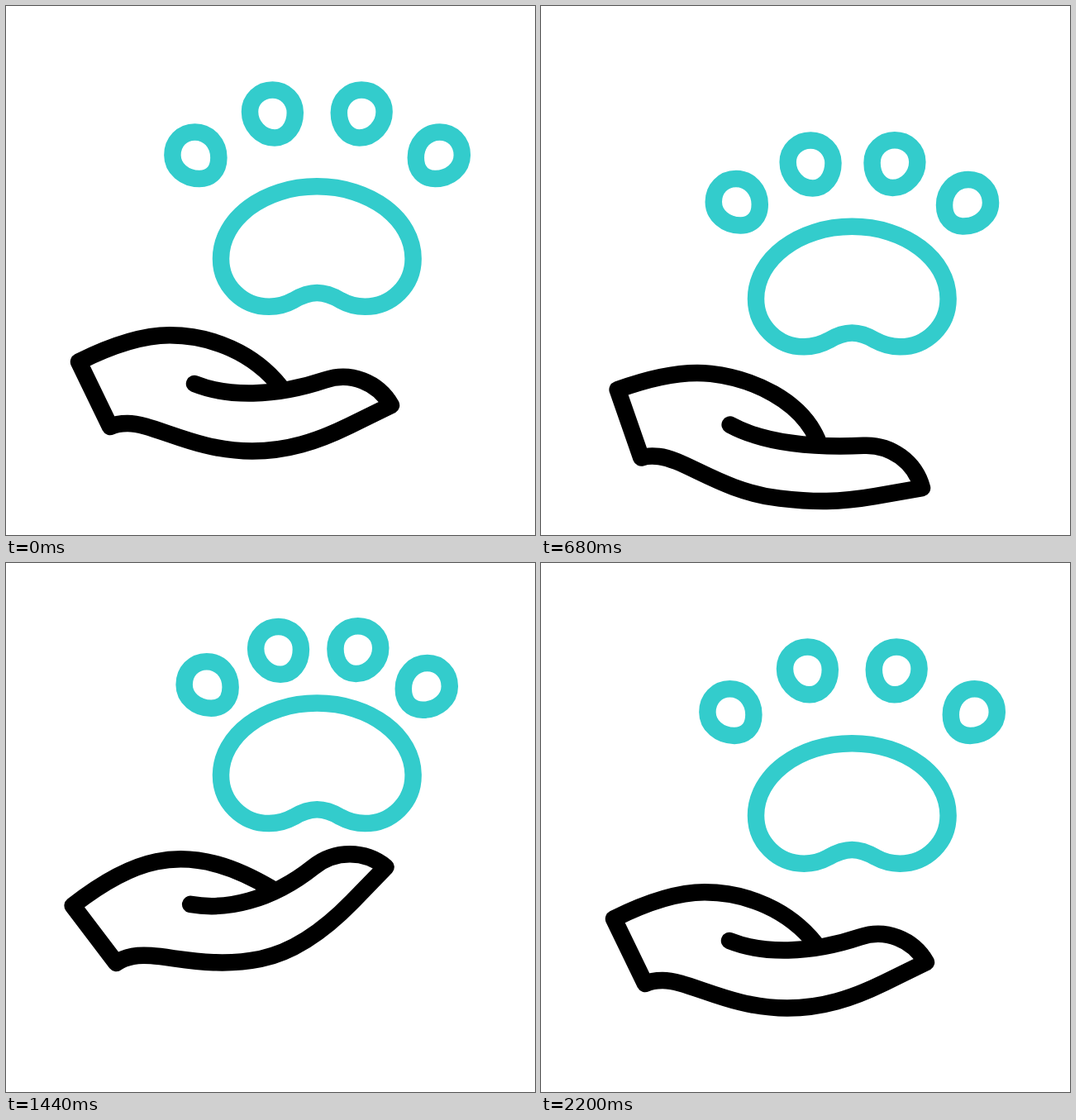
An HTML page for the animation above (2.28 s loop, 640 by 640 pixels).

```html
<!DOCTYPE html>
<html lang="en">
<head>
<meta charset="utf-8">
<title>Hand and paw</title>
<style>
  html, body { margin: 0; width: 100%; height: 100%; overflow: hidden; background: #fff; }
  svg { display: block; width: 100vw; height: 100vh; }
  path { fill: none; stroke-width: 20.5; stroke-linecap: round; stroke-linejoin: round; }
  #paw { stroke: #3cc; }
  #hand { stroke: #000; }
</style>
</head>
<body>
<svg viewBox="0 0 640 640">
  <defs>
    <path id="outer" d="M228.5 152.4C245 152.4 257.4 166 257.4 183.5C257.4 199 248 209 234 209C216 209 201.4 196.5 201.4 180.5C201.4 164.5 213 152.4 228.5 152.4Z"/>
    <path id="inner" d="M322.5 101.5C337.7 101.5 349.8 113.5 349.8 129C349.8 146 339.5 159.4 325 159.4C308 159.4 295 144 295 128C295 113 307 101.5 322.5 101.5Z"/>
  </defs>
  <g id="paw">
    <path d="M376.3 218.3C312 218.3 260 257.5 260 305.7C260 338 286 363.8 318.3 363.8C329 363.8 339 361 348 356C356.5 351 366 347 376.3 347C386.6 347 396.1 351 404.6 356C413.6 361 423.6 363.8 434.3 363.8C466.6 363.8 492.6 338 492.6 305.7C492.6 257.5 440.6 218.3 376.3 218.3Z"/>
    <g class="toe"><use href="#outer"/></g>
    <g class="toe"><use href="#inner"/></g>
    <g class="toe"><use href="#inner" transform="translate(752.6) scale(-1 1)"/></g>
    <g class="toe"><use href="#outer" transform="translate(753.2) scale(-1 1)"/></g>
  </g>
  <path id="hand"/>
</svg>
<script>
const LOOP = 2280, STEP = 40;
const paw = document.getElementById('paw');
const hand = document.getElementById('hand');
const toes = document.querySelectorAll('.toe');
const toeShift = [[18, 19.5], [9, 30.5], [-5.5, 29.5], [-19, 22]];

// cubic-bezier(.5, 0, .5, 1)
function ease(x) {
  let lo = 0, hi = 1;
  for (let i = 0; i < 24; i++) {
    const s = (lo + hi) / 2;
    if (1.5 * s * (1 - s) + s ** 3 < x) lo = s; else hi = s;
  }
  return lo * lo * (3 - 2 * lo);
}

// keys: [time, ...values]
function track(keys, t) {
  if (t <= keys[0][0]) return keys[0].slice(1);
  const n = keys.findIndex(k => k[0] > t);
  if (n < 0) return keys[keys.length - 1].slice(1);
  const a = keys[n - 1], b = keys[n];
  const u = ease((t - a[0]) / (b[0] - a[0]));
  return a.slice(1).map((v, i) => v + (b[i + 1] - v) * u);
}

const padKeys = [[90, 0], [865, 53.7], [1510, -50.5], [2230, 0]];
const toeKeys = [[285, 0], [1155, 1], [2000, 0]];
// lift, hand angle, finger angle, finger stretch
const handKeys = [
  [60, 0, 0, 0, 0],
  [740, 36, 6.7, 9, 4],
  [776, 36, 6.7, 9, 4],
  [1420, -20.5, -11.4, -9, 4],
  [2165, 0, 0, 0, 0]
];

// Fingers turn about a knuckle; the rest of the palm stays rigid.
function handPath(angle, stretch) {
  const a = angle * Math.PI / 180, c = Math.cos(a), s = Math.sin(a);
  const f = (x, y) => {
    const dx = (x - 320) * (1 + stretch / 146), dy = y - 480;
    return `${(320 + dx * c - dy * s).toFixed(2)} ${(480 + dx * s + dy * c).toFixed(2)} `;
  };
  return 'M88 430.5C125 412 163 398.3 198 398.3C249 398.3 ' + f(300, 420) + f(332, 460.5) +
    'M228 457C268 473 ' + f(325, 473) + f(386, 452.5) +
    'C' + f(417, 442) + f(450, 455) + f(466, 483) +
    'L' + f(415, 508) +
    'C' + f(376, 527) + '340 538.5 298 538.5' +
    'C228 538.5 180 505 147 505C139 505 132 506 126 509L88 430.5';
}

function draw() {
  const t = Math.floor(performance.now() % LOOP / STEP) * STEP;
  const [padY] = track(padKeys, t);
  const [pinch] = track(toeKeys, t);
  const [lift, angle, bend, stretch] = track(handKeys, t);
  paw.setAttribute('transform', `translate(0 ${padY})`);
  toes.forEach((toe, i) => {
    const [x, y] = toeShift[i];
    toe.setAttribute('transform', `translate(${x * pinch} ${y * pinch})`);
  });
  hand.setAttribute('transform', `translate(0 ${lift}) rotate(${angle} 107 469.5)`);
  hand.setAttribute('d', handPath(bend, stretch));
  requestAnimationFrame(draw);
}
draw();
</script>
</body>
</html>
```
